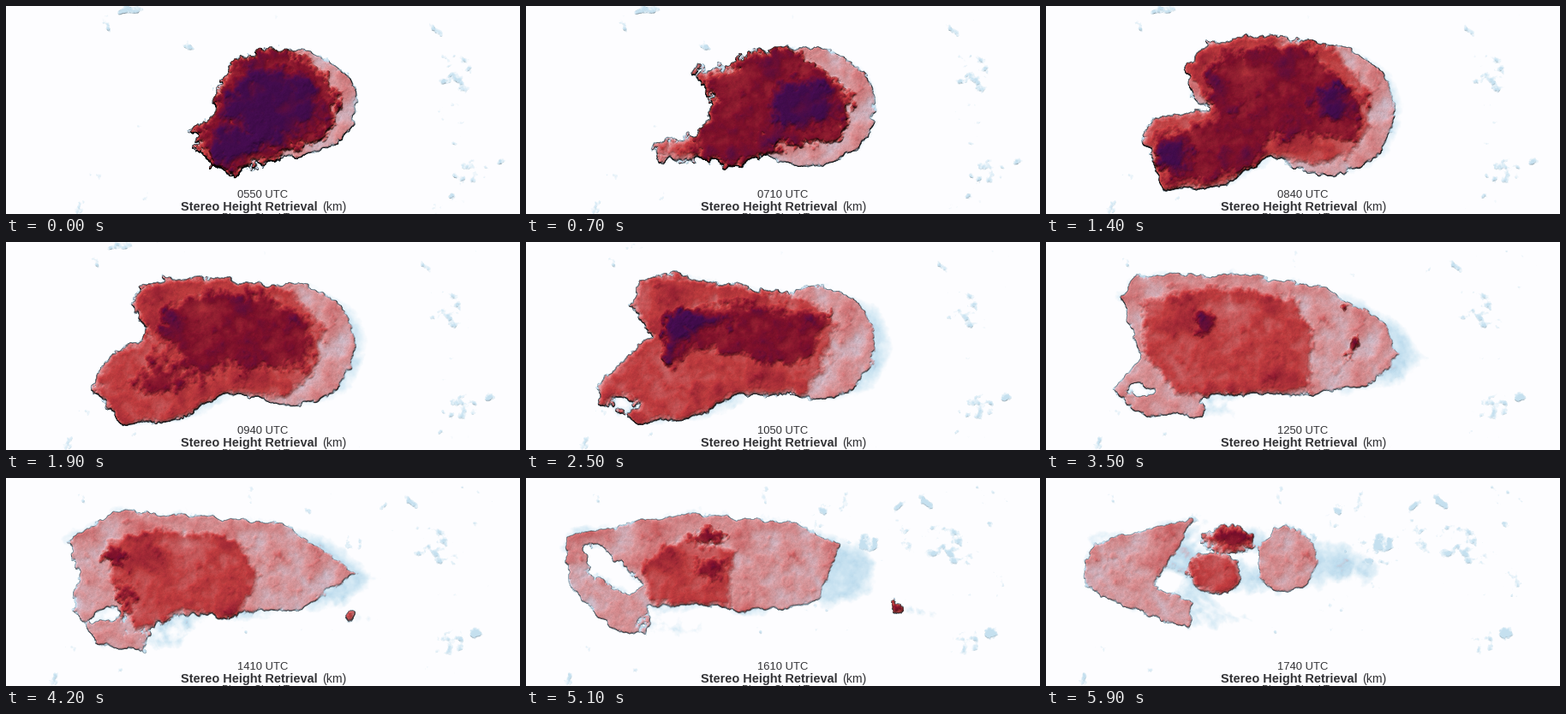
These frames come from a looping animation (600 by 243 pixels, 6 s). A matplotlib script:

```python
import numpy as np
import matplotlib.pyplot as plt
from matplotlib.animation import FuncAnimation
from matplotlib.path import Path

W, H, DPI = 600, 243, 100
FRAMES, INTERVAL = 60, 100
Y, X = np.mgrid[0:H, 0:W].astype(np.float32)
PIXELS = np.column_stack([X.ravel(), Y.ravel()])

# Key poses of the cloud, by frame. Levels run from 2 (pale) to 5 (highest),
# level 0 is an opening. Four numbers are an ellipse (cx, cy, rx, ry),
# longer tuples are the key points of an outline.
POSES = {
    0: {2: [(328, 114, 84, 63)],
        4: [(314, 112, 73, 62),
            (216, 146, 224, 167, 250, 190, 270, 200, 294, 190, 330, 172, 250, 110)],
        5: [(312, 115, 66, 48), (262, 160, 34, 30)]},
    14: {2: [(325, 122, 83, 76), (184, 88, 18, 30)],
         3: [(186, 42, 160, 75, 189, 120, 125, 130, 110, 150, 135, 217, 210, 208, 262, 177,
              310, 188, 356, 177, 380, 140, 379, 98, 335, 46, 268, 33)],
         4: [(205, 50, 300, 43, 373, 105, 362, 158, 265, 155, 240, 190, 146, 214, 122, 172,
              125, 148, 192, 128, 182, 80)],
         5: [(335, 115, 31, 26), (223, 123, 10, 9), (150, 172, 28, 26)]},
    25: {2: [(340, 118, 68, 66)],
         3: [(175, 36, 130, 45, 122, 75, 144, 110, 80, 165, 85, 190, 130, 213, 210, 200,
              240, 180, 330, 179, 366, 95, 330, 62, 210, 46)],
         4: [(155, 82, 230, 66, 364, 82, 328, 146, 285, 146, 200, 128, 170, 151, 155, 142)],
         5: [(157, 82, 247, 76, 250, 97, 195, 110, 170, 149, 157, 140)],
         0: [(113, 190, 12, 6)]},
    35: {2: [(105, 38, 87, 65, 110, 135, 72, 172, 110, 202, 182, 203, 190, 178, 310, 179,
              385, 165, 412, 130, 395, 92, 330, 55, 236, 38)],
         3: [(112, 65, 200, 50, 290, 62, 314, 110, 309, 176, 270, 178, 150, 180, 112, 130)],
         4: [(184, 96, 14, 14), (347, 74, 8, 5), (358, 123, 5, 8)],
         0: [(220, 188, 33, 8), (301, 187, 14, 7), (114, 173, 11, 5)]},
    42: {2: [(125, 38, 70, 75, 85, 110, 77, 155, 105, 195, 160, 203, 175, 166, 345, 153,
              410, 112, 330, 55, 215, 43)],
         3: [(115, 72, 180, 56, 270, 70, 300, 115, 270, 162, 200, 160, 150, 178, 120, 120),
             (402, 161, 6, 6)],
         4: [(128, 90, 16, 15), (140, 138, 14, 22)],
         0: [(235, 180, 62, 11), (120, 161, 13, 6)]},
    51: {2: [(56, 66, 180, 40, 320, 54, 367, 78, 342, 140, 300, 155, 145, 150, 140, 183,
              95, 178, 50, 125, 47, 70)],
         3: [(130, 98, 190, 62, 247, 85, 241, 151, 145, 148)],
         4: [(208, 72, 22, 15), (215, 105, 22, 14), (432, 153, 6, 6)],
         0: [(68, 84, 85, 79, 134, 125, 120, 136, 72, 110), (200, 168, 56, 14),
             (335, 164, 28, 10)]},
    59: {2: [(44, 108, 55, 76, 175, 44, 128, 125, 172, 145, 165, 172, 100, 156, 45, 126),
             (280, 95, 36, 38)],
         3: [(210, 74, 32, 18), (198, 110, 33, 25)],
         4: [(211, 73, 29, 15)],
         0: [(145, 122, 15, 12)]},
}
KEYS = list(POSES)

LEVELS = (5, 4, 3, 2)
SOFTNESS = {2: 3, 3: 7, 4: 9, 5: 15}
ROUGHNESS = {2: 2, 3: 2.5, 4: 4, 5: 4}
STOPS = [0, 0.5, 1, 1.5, 2, 3, 4, 5]
COLOURS = np.array([(253, 253, 255), (218, 236, 246), (188, 219, 237), (205, 180, 192),
                    (212, 144, 147), (188, 60, 62), (124, 16, 42), (66, 12, 76)]) / 255


def distance(shape):
    """Signed distance to a shape, positive inside."""
    if len(shape) == 4:
        cx, cy, rx, ry = shape
        return (1 - np.hypot((X - cx) / rx, (Y - cy) / ry)) * min(rx, ry)
    pts = np.array(shape, np.float32).reshape(-1, 2)
    best = np.full((H, W), 1e9, np.float32)
    for (px, py), (qx, qy) in zip(pts, np.roll(pts, -1, axis=0)):
        dx, dy = qx - px, qy - py
        t = np.clip(((X - px) * dx + (Y - py) * dy) / (dx * dx + dy * dy), 0, 1)
        best = np.minimum(best, (X - px - t * dx) ** 2 + (Y - py - t * dy) ** 2)
    inside = Path(pts).contains_points(PIXELS).reshape(H, W)
    return np.where(inside, 1, -1) * np.sqrt(best)


def union(shapes):
    if not shapes:
        return np.full((H, W), -30, np.float32)
    return np.max([distance(s) for s in shapes], axis=0).astype(np.float32)


def cloud_noise(seed, scale, power):
    """Tileable noise with unit deviation; scale is the largest feature in pixels."""
    rng = np.random.default_rng(seed)
    fy, fx = np.fft.fftfreq(H)[:, None], np.fft.rfftfreq(W)[None, :]
    gain = (fx ** 2 + fy ** 2 + scale ** -2.0) ** (-power / 2)
    n = np.fft.irfft2(np.fft.rfft2(rng.normal(size=(H, W))) * gain, s=(H, W))
    return ((n - n.mean()) / n.std()).astype(np.float32)


FIELDS = [{k: union(p.get(k, [])) for k in LEVELS + (0,)} for p in POSES.values()]
BILLOW = cloud_noise(3, 60, 2.3)
RAGGED = cloud_noise(8, 22, 2.3)
WISPS = cloud_noise(12, 40, 2.2)
GRAIN = cloud_noise(5, 3, 1.0)


def blend(frame):
    i = min(np.searchsorted(KEYS, frame, side="right") - 1, len(KEYS) - 2)
    t = (frame - KEYS[i]) / (KEYS[i + 1] - KEYS[i])
    a, b = FIELDS[i], FIELDS[i + 1]
    return {k: a[k] * (1 - t) + b[k] * t for k in a}


def bump(cx, cy, rx, ry):
    return np.exp(-((X - cx) / rx) ** 2 - ((Y - cy) / ry) ** 2)


EAST, NORTHWEST, DEBRIS = bump(528, 130, 38, 130), bump(150, 0, 45, 15), bump(385, 80, 110, 75)


def haze(frame, ragged):
    """Thin low cloud: noise that shows only inside a few soft regions."""
    early = np.clip((40 - frame) / 20, 0, 1)
    late = np.clip((frame - 22) / 30, 0, 1)
    cover = 2.0 * EAST + 3.2 * early * NORTHWEST + 2.7 * late * DEBRIS - 3
    drift = np.roll(WISPS, -int(frame * 0.7), 1)
    return 0.85 * np.clip((drift + 0.25 * ragged + cover) / 0.9, 0, 1)


def fringe(body, frame):
    """Outer anvil: the body smeared downwind, further as time passes."""
    tail = 85 * (frame / 59) ** 1.4
    steps = [np.roll(body, (int(0.15 * s * tail), int(s * tail)), (0, 1)) - 0.2 * s * tail
             for s in np.linspace(0, 1, 6)]
    return np.max(steps, axis=0)


def sky(frame):
    d = blend(frame)
    drift = -int(frame * 0.8)
    billow, ragged = np.roll(BILLOW, drift, 1), np.roll(RAGGED, drift, 1)
    wall = -d[0] + 2 * ragged

    # Each layer contains the one above it.
    height = np.zeros((H, W), np.float32)
    top = np.full((H, W), -1e3, np.float32)
    for k in LEVELS:
        wobble = 0.7 * ragged + 0.3 * np.roll(billow, 37 * k, 0)
        top = np.maximum(top, d[k] + ROUGHNESS[k] * wobble)
        height += np.clip(np.minimum(top, wall) / SOFTNESS[k], 0, 1)
    thin = np.minimum(fringe(top, frame), wall + 4) + 4 * billow * (frame / 59)
    thin = np.clip(thin / 14, 0, 1) * (0.85 + 0.12 * ragged)
    height += np.maximum(thin, np.clip(np.minimum(top, wall) / 2, 0, 1))

    solid = np.clip(height - 0.8, 0, 1)
    ring = np.hypot(X - 328, (Y - 107) * 1.15)
    ripple = np.cos(ring / 4.2) * np.exp(-ring / 45) * max(0, 1 - frame / 14)
    height += solid * (0.2 * billow + 0.08 * ragged + 0.1 * ripple)
    height = np.maximum(height, haze(frame, ragged))

    gy, gx = np.gradient(height)
    facing = np.clip(-gy, 0, 1) + 0.3 * np.clip(-gx, 0, 1)
    shadow = np.clip(np.hypot(gx, gy) - 0.35, 0, 0.55) + np.clip(1.2 * (facing - 0.1), 0, 0.4)
    shadow *= (1 - 0.45 * frame / 59) * np.clip(height, 0, 1)
    relief = 1 + solid * (0.6 * np.clip(gx + gy, -0.15, 0.15) + 0.018 * GRAIN)

    rgb = np.stack([np.interp(height, STOPS, COLOURS[:, c]) for c in range(3)], axis=-1)
    return np.clip(rgb * ((1 - shadow) * relief)[..., None], 0, 1)


def clock(frame):
    step = round(frame * 70 / 59)
    step += step >= 53  # no scan at 1440
    minutes = 5 * 60 + 50 + 10 * step
    return f"{minutes // 60:02d}{minutes % 60:02d} UTC"


fig = plt.figure(figsize=(W / DPI, H / DPI), dpi=DPI)
ax = fig.add_axes([0, 0, 1, 1])
ax.axis("off")
image = ax.imshow(np.ones((H, W, 3)), interpolation="nearest", aspect="auto")


def label(x, y, text, px, **style):
    return fig.text(x / W, 1 - y / H, text, fontsize=px * 72 / DPI, color="#333336",
                    family="Liberation Sans", va="baseline", **style)


stamp = label(300, 224, "", 13, ha="center")
label(204, 239, "Stereo Height Retrieval", 14.5, weight="bold")
label(369, 239, "(km)", 14)
label(300, 251, "Plume Cloud Tops", 12, ha="center")


def draw(frame):
    image.set_data(sky(frame))
    stamp.set_text(clock(frame))
    return image, stamp


anim = FuncAnimation(fig, draw, frames=FRAMES, interval=INTERVAL, repeat=True,
                     repeat_delay=0, blit=False)
plt.show()
```
